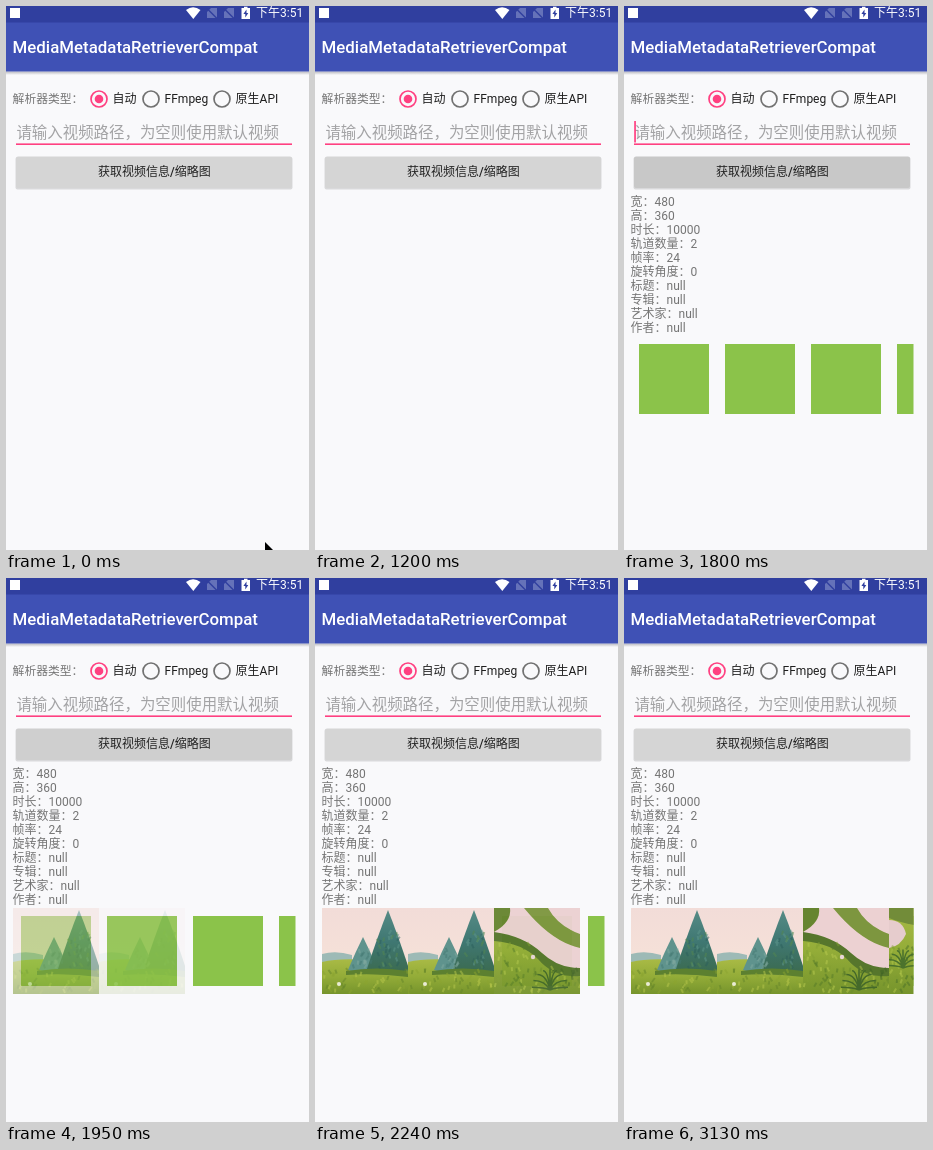
Animation of 303x544 px, one loop 3230 ms. Source, as an HTML page:

```html
<!DOCTYPE html>
<html lang="zh">
<head>
<meta charset="utf-8">
<title>MediaMetadataRetrieverCompat</title>
<style>
  html, body { margin: 0; width: 100%; height: 100%; overflow: hidden; background: #f9f9fb; }
  svg { display: block; width: 100%; height: 100%; }
  text { font-family: Roboto, "Noto Sans CJK SC", "Noto Sans CJK", sans-serif; font-size: 12px; white-space: pre; }
</style>
</head>
<body>
<svg id="stage" viewBox="0 0 303 544"></svg>
<script>
const LOOP = 3230;
const TICKS = [0, 300, 450, 600, 750, 900, 1200, 1500, 1650, 1800, 1950, 2090, 2240, 2390, 2540, 2690, 2980, 3130];
const PINK = '#ff4081';
const CELL = 86;

let seed = 7;
const rand = () => (seed = (seed * 16807) % 2147483647) / 2147483647;

const path = (d, fill, extra = '') => `<path d="${d}" fill="${fill}" ${extra}/>`;
const rect = (x, y, w, h, fill, extra = '') =>
  `<rect x="${x}" y="${y}" width="${w}" height="${h}" fill="${fill}" ${extra}/>`;
const label = (x, y, str, fill, extra = '') =>
  `<text x="${x}" y="${y}" fill="${fill}" ${extra}>${str}</text>`;
const gradient = (id, ...colors) =>
  `<linearGradient id="${id}" x1="0" y1="0" x2="0" y2="1">${colors.map((c, i) =>
    `<stop offset="${i / (colors.length - 1)}" stop-color="${c}"/>`).join('')}</linearGradient>`;

// Scattered short strokes inside a box
function tufts(x, y, w, h, count, colors) {
  let out = '';
  for (let i = 0; i < count; i++) {
    const px = x + rand() * w, py = y + rand() * h;
    out += `<path d="M${px.toFixed(1)} ${py.toFixed(1)}l${(rand() * 6 - 3).toFixed(1)} -4" ` +
      `stroke="${colors[i % colors.length]}" stroke-width="2" opacity=".5"/>`;
  }
  return out;
}

// Fan of leaves around one root
function fern(x, y, r, color) {
  let d = '';
  for (let i = 0; i < 9; i++) {
    const a = Math.PI * (1 + i / 8);
    const dx = r * Math.cos(a), dy = r * (Math.sin(a) - .15);
    d += `M${x} ${y}q${(dx * .3).toFixed(1)} ${dy.toFixed(1)} ${dx.toFixed(1)} ${dy.toFixed(1)}`;
  }
  return path(d, 'none', `stroke="${color}" stroke-width="1.5"`);
}

// Full, slightly bulging conifer
function fir(x, top, base, half, color) {
  const mid = top + (base - top) * .45;
  return path(`M${x} ${top}Q${x + half * .5} ${mid} ${x + half} ${base}` +
    `Q${x} ${base + 5} ${x - half} ${base}Q${x - half * .5} ${mid} ${x} ${top}Z`, color);
}

const scenes = {
  meadow: () => rect(0, 0, 86, 86, 'url(#sky)') +
    path('M0 46Q14 42 30 47V62H0Z', '#9dbab6') +
    path('M0 54Q30 47 86 58V86H0Z', 'url(#field)') +
    fir(41, 29, 62, 15, '#5f938d') + fir(66, 2, 64, 22, 'url(#fir)') +
    tufts(32, 42, 18, 20, 14, ['#447973', '#82aaa0']) +
    tufts(57, 26, 20, 36, 30, ['#2c5f5c', '#5f978c', '#54874f']) +
    path('M24 63Q55 58 86 63V69Q55 65 24 67Z', '#5c8030') +
    tufts(0, 64, 86, 22, 40, ['#65852a', '#b9c84c', '#8ba431']) +
    '<circle cx="17" cy="76" r="2" fill="#e9ebd5"/>',

  trail: () => rect(0, 0, 86, 86, 'url(#field)') +
    path('M0 0H86V60Q64 62 48 46Q30 30 0 26Z', '#ecd1d2') +
    path('M0 0H16Q18 14 0 24Z', '#66852f') +
    path('M30 0H54Q64 18 86 26V40Q58 34 30 0Z', '#7d963f') +
    path('M0 24Q30 28 48 45Q64 60 86 60V68Q60 70 44 51Q28 35 0 33Z', '#56762c') +
    tufts(0, 36, 36, 50, 44, ['#557a28', '#b9cb50', '#83a033']) +
    tufts(36, 62, 50, 24, 34, ['#3f6425', '#b4c64b', '#6b8c2d']) +
    fern(56, 82, 18, '#44692a') +
    '<circle cx="39" cy="49" r="2.2" fill="#ead7d8"/>',

  bank: () => rect(0, 0, 86, 86, 'url(#field)') +
    path('M0 0H86V24Q24 20 0 10Z', '#728c39') +
    path('M0 12Q14 12 17 26Q12 38 0 40Z', '#e6cccd') +
    tufts(0, 40, 26, 46, 34, ['#4a7029', '#b4c84c', '#7d9c31']) +
    fern(14, 60, 16, '#4b722c')
};

const shot = (id, scene, i) =>
  `<g id="${id}" transform="translate(${7 + i * CELL} 330)"><svg width="${CELL}" height="${CELL}" ` +
  `viewBox="0 0 86 86">${scenes[scene]()}</svg></g>`;

const radio = (x, name, on) =>
  `<circle cx="${x}" cy="93" r="8" fill="none" stroke="${on ? PINK : '#717171'}" stroke-width="1.7"/>` +
  (on ? `<circle cx="${x}" cy="93" r="4.3" fill="${PINK}"/>` : '') +
  label(x + 13.6, 97.2, name, '#1f1f1f');

const sim = x => path(`M${x + 4} 2H${x + 10}V12H${x}V6Z`, '#6572b9') +
  path(`M${x - .5} 2L${x + 10.5} 13`, 'none', 'stroke="#303f9f" stroke-width="1.4"');

const info = ['宽：480', '高：360', '时长：10000', '轨道数量：2', '帧率：24', '旋转角度：0',
  '标题：null', '专辑：null', '艺术家：null', '作者：null'];

document.getElementById('stage').innerHTML = `
  <defs>
    ${gradient('sky', '#f2dcd8', '#f5e0d8', '#efe3d0')}
    ${gradient('field', '#a9ba45', '#93ac38', '#76942c')}
    ${gradient('fir', '#568b86', '#3f7772', '#3b6a4e')}
    ${gradient('shade', '#b9b9bf', '#f9f9fb')}
    <clipPath id="strip"><rect x="7" y="330" width="282.5" height="86"/></clipPath>
  </defs>
  ${rect(0, 0, 303, 544, '#f9f9fb')}
  ${rect(0, 65.5, 303, 3.5, 'url(#shade)')}
  ${rect(0, 0, 303, 65.5, '#3f51b5')}
  ${rect(0, 0, 303, 16.5, '#303f9f')}
  ${rect(4, 2, 10, 10, '#fff')}
  ${path('M180 4Q187 -1.5 194.500 4L187.300 13Z', '#fff')}
  ${sim(201)}${sim(218)}
  ${path('M235.500 2H238V.8H241.500V2H244V13H235.500Z', '#fff')}
  ${path('M240.500 3.500L237.400 8H239.300V11.500L242.300 7H240.500Z', '#303f9f')}
  ${label(250, 11, '下午3:51', '#fff')}
  ${label(6.6, 47.4, 'MediaMetadataRetrieverCompat', '#fff', 'style="font-size:16.83px;font-weight:500"')}
  ${label(6.6, 97.2, '解析器类型：', '#757575', 'style="font-size:11.8px"')}
  ${radio(93, '自动', true)}${radio(145, 'FFmpeg')}${radio(216, '原生API')}
  ${label(10.4, 131.5, '请输入视频路径，为空则使用默认视频', '#a3a3a5', 'style="font-size:15.45px"')}
  ${rect(10, 137.4, 276, 1.6, PINK)}
  ${rect(10.2, 115, 1.7, 21.5, PINK, 'id="caret"')}
  ${rect(9.5, 151, 277, 32.5, '#000', 'rx="2" opacity=".13"')}
  ${rect(10, 150.5, 276, 31.5, '#d5d5d5', 'rx="2" id="button"')}
  ${label(148.4, 170.4, '获取视频信息/缩略图', '#222', 'text-anchor="middle" style="font-weight:500"')}
  <g id="result">
    ${info.map((s, i) => label(6.6, 199.6 + i * 14.07, s, '#757575')).join('')}
    <g clip-path="url(#strip)">
      ${[0, 1, 2, 3].map(i => rect(15 + i * CELL, 338, 70, 70, '#8bc34a')).join('')}
      ${['meadow', 'meadow', 'trail', 'bank'].map((scene, i) => shot('shot' + i, scene, i)).join('')}
    </g>
  </g>
  <path id="mouse" d="M0 0V12L3 9.500L5 14L7 13L5 9H9Z" fill="#000"/>`;

const el = id => document.getElementById(id);
const put = (id, name, value) => el(id).setAttribute(name, value);
const visible = (id, on) => put(id, 'visibility', on ? 'visible' : 'hidden');
const within = (t, a, b) => t >= a && t < b;

const FADE = 250;
const starts = [1820, 1920, 2000, 2310];

function draw(time) {
  const t = TICKS.findLast(k => k <= time);
  visible('caret', within(t, 450, 900) || within(t, 1500, 1950) || within(t, 2390, 2980));
  visible('mouse', t < 750);
  put('mouse', 'transform', t < 600 ? 'translate(259 536)' : 'translate(257 540)');

  const press = within(t, 1650, 1950) ? 1 : t === 1500 || t === 1950 ? .5 : 0;
  const grey = 213 - 13 * press;
  put('button', 'fill', `rgb(${grey},${grey},${grey})`);

  visible('result', t >= 1800);
  starts.forEach((start, i) =>
    put('shot' + i, 'opacity', Math.min(1, Math.max(0, (t - start) / FADE))));
}

const begin = performance.now();
function frame() {
  draw((performance.now() - begin) % LOOP);
  requestAnimationFrame(frame);
}
frame();
</script>
</body>
</html>
```
